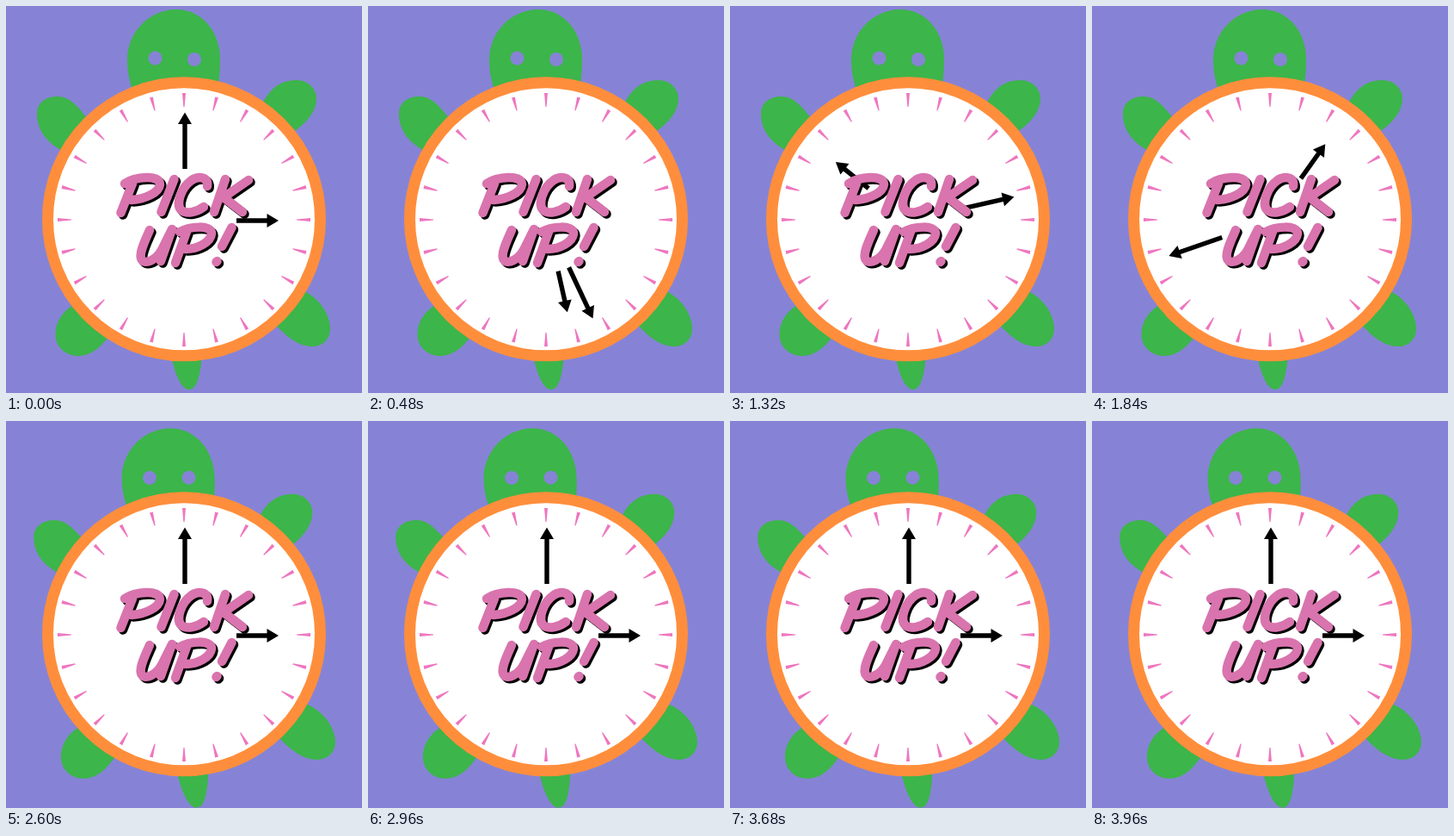
These frames come from a looping animation (414x449 px, 4 s). An HTML page:

```html
<!DOCTYPE html>
<html lang="en">
<head>
<meta charset="utf-8">
<title>Pick up!</title>
<style>
  html, body { margin: 0; width: 100%; height: 100%; overflow: hidden; background: #8683d6; }
  svg { display: block; width: 414px; height: 449px; }
  .lettering { fill: none; stroke-width: 10.5; stroke-linecap: round; stroke-linejoin: round; }
</style>
</head>
<body>
<svg viewBox="0 0 414 449" role="img" aria-label="PICK UP!">
  <defs>
    <g id="words">
      <path d="M147 206L133.5 240M138 206C150 198 179 195 179 207C178 217 161 224 146 225"/>
      <path d="M195.500 201L180.500 239"/>
      <path d="M234 209C236 198 224 197 216 202C203 211 197 231 204 237C210 242 222 239 230 233"/>
      <path d="M255 201L242 239M282 202L253 222L275 239"/>
      <path d="M167 260C162 272 154 287 157.500 294C162 301 175 294 181 283L193 259L180 296"/>
      <path d="M210 262L197 298M202 262C213 256 239 253 239 264C238 274 223 282 209 282"/>
      <path d="M262.500 257L251 279M245.500 296L244.500 297"/>
    </g>
  </defs>

  <g id="turtle" fill="#3cb54a">
    <path d="M147 98C143 85 141 75 141 62C141 31 166 4 198 4C228 4 249 30 249 62C249 75 248 85 246 98L207 247Z"/>
    <path d="M98 135C85 118 75 105 60 105C45 105 36 113 36 125C36 145 48 159 69 170L207 247Z"/>
    <path d="M296 118C305 97 318 86 338 86C352 86 361 97 361 107C361 125 345 140 328 150L207 247Z"/>
    <path d="M345 330C364 338 377 358 377 374C377 387 368 395 356 395C340 395 325 383 312 368L207 247Z"/>
    <path d="M82 345C67 352 57.500 366 57.500 381C57.500 396 70 406 84 406C100 406 112 394 122 380L207 247Z"/>
    <path d="M192 405C196 425 203 445 213 445C223 445 226 425 228 405L207 247Z"/>
    <g fill="#8683d6">
      <circle cx="173.5" cy="60.5" r="8"/>
      <circle cx="219" cy="62" r="8"/>
    </g>
  </g>

  <circle cx="207" cy="247.3" r="158.5" fill="#fff" stroke="#ff8e3c" stroke-width="13"/>
  <g id="ticks" fill="#ee76bf"></g>
  <path id="minute" d="M0 -125.500L8 -112H2.700V-60H-2.700V-112H-8Z"/>
  <path id="hour" d="M0 -109L8 -95.500H2.700V-60H-2.700V-95.500H-8Z"/>

  <g class="lettering">
    <use href="#words" x="2.5" y="2.5" stroke="#000"/>
    <use href="#words" stroke="#d974ae"/>
  </g>
</svg>
<script>
  const LOOP = 4000, STEP = 40, SHAKE_START = 2480;
  const el = id => document.getElementById(id);
  const setTransform = (id, value) => el(id).setAttribute('transform', value);

  for (let i = 0; i < 24; i++) {
    el('ticks').innerHTML +=
      `<path d="M-2 -147H2L.6 -131H-.6Z" transform="translate(207 248) rotate(${i * 15})"/>`;
  }

  // Two turns of the minute hand, very slightly eased at both ends.
  function minuteAngle(t) {
    const u = Math.min(1, Math.max(0, (t - 11) / 2160));
    return 720 * u - 1.6 * Math.sin(2 * Math.PI * u);
  }

  function turtlePose(t) {
    if (t < SHAKE_START) return '';
    // The shake flips every step, pausing for one step each 200 ms.
    const pauses = Math.max(0, Math.floor((t - 2600) / 200));
    const flips = (t - SHAKE_START) / STEP - pauses;
    const side = flips % 2 ? 1 : -1;
    return `translate(${side} 4) rotate(${-2.3 * side} 207 247)`;
  }

  function draw(now) {
    const t = Math.floor(now % LOOP / STEP) * STEP;
    const angle = minuteAngle(t);
    setTransform('minute', `translate(208 249) rotate(${angle})`);
    setTransform('hour', `translate(208 249) rotate(${90 + angle / 2})`);
    setTransform('turtle', turtlePose(t));
  }

  let start;
  function tick(now) {
    start ??= now;
    draw(now - start);
    requestAnimationFrame(tick);
  }
  draw(0);
  requestAnimationFrame(tick);
</script>
</body>
</html>
```
